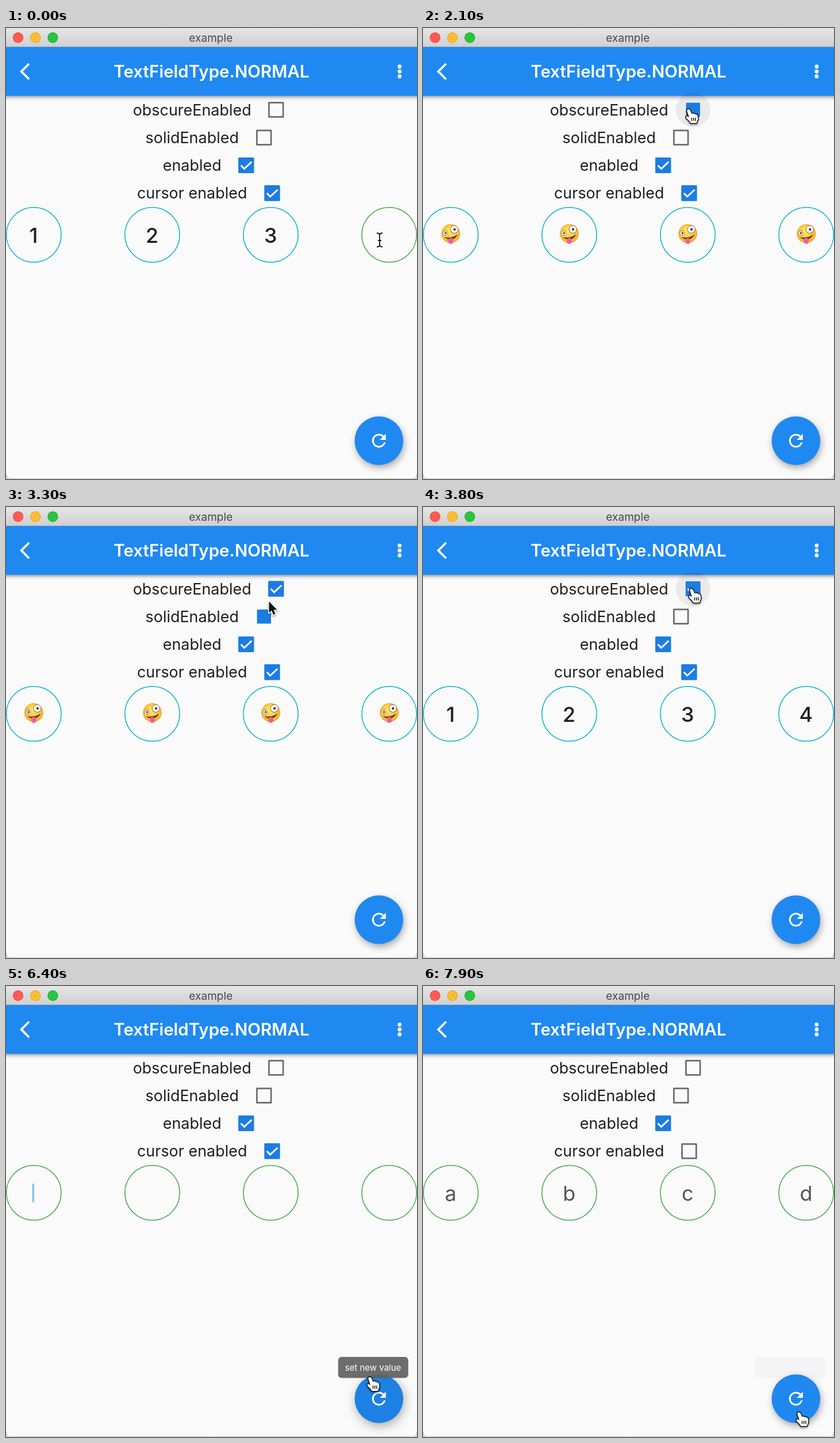
Write an HTML page with a canvas that moves like this. It is 715 px wide and 783 px high and loops after 8 s.

```html
<!DOCTYPE html>
<html lang="en">
<head>
<meta charset="utf-8">
<title>Text field demo</title>
<style>
  html, body { margin: 0; width: 100%; height: 100%; overflow: hidden; background: #fafafa; }
  canvas { display: block; }
</style>
</head>
<body>
<canvas id="stage" width="715" height="783"></canvas>
<script>
const g = document.getElementById('stage').getContext('2d');
const LOOP = 8000, STEP = 100;
const BLUE = '#1f89f1', INK = '#1f1f1f';
const FIELDS = [48.3, 254.5, 460.6, 666.7], FIELD_Y = 359;
const FAB = { x: 648.8, y: 716.5, r: 42.3 };

const refreshIcon = new Path2D('M17.65 6.35C16.2 4.9 14.21 4 12 4c-4.42 0-7.99 3.58-7.99 8s3.57 8 7.99 8c3.73 0 6.84-2.55 7.73-6h-2.08c-.82 2.33-3.04 4-5.65 4-3.31 0-6-2.69-6-6s2.69-6 6-6c1.66 0 3.14.69 4.22 1.78L13 11h7V4z');
const backIcon = new Path2D('M11.67 3.87L9.9 2.1 0 12l9.9 9.9 1.77-1.77L3.54 12z');
const hand = new Path2D('M-3 3Q-3 0 0 0Q2 0 3 2L6 9Q8 7 10 9Q12 8 13 10Q16 9 17 12L18 18Q17 21 15 26L4 26Q1 21-4 17Q-6 13-3 13L1 15Z');
const knuckles = new Path2D('M6 16v6M9.5 16v6M13 16v6');
const arrow = new Path2D('M0 0V20L4.6 15.8L7.6 23L11 21.5L8 14.5H14.2Z');
const ibeam = new Path2D('M-5-12Q0-12 0-8Q0-12 5-12M0-8V8M-5 12Q0 12 0 8Q0 12 5 12M-3 1H3');

// Pointer hot spot: time, x, y
const route = [
  [0, 650, 368], [500, 650, 368], [1500, 462, 141], [2200, 462, 141],
  [2500, 448, 186], [3100, 448, 186], [3500, 467, 142], [3900, 467, 142],
  [4500, 668, 369], [5300, 668, 369], [6000, 640, 700], [6400, 633, 679],
  [6900, 460, 286], [7100, 460, 286], [7600, 654, 740], [8000, 654, 740]
];

const clamp = v => Math.max(0, Math.min(1, v));
const ramp = (t, a, b) => clamp((t - a) / (b - a));
const pulse = (t, on, off, d = 200) => ramp(t, on, on + d) - ramp(t, off, off + d);

function pointerAt(t) {
  const i = route.findIndex(k => k[0] > t);
  const [a, x, y] = route[i - 1], [b, u, v] = route[i];
  const p = ramp(t, a, b), e = p * p * (3 - 2 * p);
  return { x: x + (u - x) * e, y: y + (v - y) * e };
}

function oval(x, y, rx, ry, color, turn = 0) {
  g.beginPath();
  g.ellipse(x, y, rx, ry, turn, 0, 7);
  g.fillStyle = color;
  g.fill();
}

const disc = (x, y, r, color) => oval(x, y, r, r, color);

function line(color, width, ...pts) {
  g.beginPath();
  pts.forEach(p => g.lineTo(...p));
  g.strokeStyle = color;
  g.lineWidth = width;
  g.stroke();
}

function icon(path, x, y) {
  g.save();
  g.translate(x, y);
  g.scale(1.5, 1.5);
  g.fillStyle = '#fff';
  g.fill(path);
  g.restore();
}

function text(s, x, y, size, color = INK, weight = 400) {
  g.font = `${weight} ${size}px Inter, sans-serif`;
  g.textAlign = 'center';
  g.fillStyle = color;
  g.fillText(s, x, y);
}

function shadow(color, blur, x, y) {
  Object.assign(g, { shadowColor: color, shadowBlur: blur, shadowOffsetX: x, shadowOffsetY: y });
}

function drawBars() {
  g.save();
  shadow('rgba(0,0,0,.42)', 6, 0, 2);
  g.fillStyle = BLUE;
  g.fillRect(-10, 33, 735, 84.8);
  g.restore();
  const grad = g.createLinearGradient(0, 0, 0, 33);
  grad.addColorStop(0, '#e6e6e6');
  grad.addColorStop(1, '#cfcfcf');
  g.fillStyle = grad;
  g.fillRect(0, 0, 715, 33);
  line('#b5b3b0', 1, [0, 32.5], [715, 32.5]);
  [[21, '#df4744', '#ff5952'], [51.2, '#dea031', '#ffbc2e'], [81.4, '#22a131', '#28c63f']].forEach(([x, rim, fill]) => {
    disc(x, 16.8, 9.2, rim);
    disc(x, 16.8, 8.3, fill);
  });
  text('example', 356.3, 24, 19.1, '#484848');
  text('TextFieldType.NORMAL', 357.5, 86, 29.5, '#fff', 600);
  icon(backIcon, 24, 57.5);
  [67, 75.5, 84].forEach(y => disc(684.8, y, 3.4, '#fff'));
}

function checkbox(x, y, p, hover) {
  if (hover) disc(x, y, 30, 'rgba(0,0,0,.062)');
  const fill = clamp(p * 2), hole = 22 * (1 - fill);
  const half = 12.2 + 3 * Math.abs(p - .5);
  const mix = (a, b) => a + (b - a) * fill;
  g.beginPath();
  g.roundRect(x - half, y - half, half * 2, half * 2, 1.5);
  if (hole > 0) g.rect(x - hole / 2, y - hole / 2, hole, hole);
  g.fillStyle = `rgb(${mix(107, 28)},${mix(107, 124)},${mix(107, 227)})`;
  g.fill('evenodd');
  if (p > .5) {
    g.save();
    g.setLineDash([26 * (p * 2 - 1), 99]);
    line('#fff', 2.9, [x - 9.2, y], [x - 3.3, y + 6], [x + 9.7, y - 6.2]);
    g.restore();
  }
}

function eye(x, y, r, pupil) {
  disc(x, y, r, '#7a5a2c');
  disc(x, y, r - .8, '#fff');
  disc(x + .4, y, pupil, '#4a2c18');
}

function zanyFace(x, y) {
  g.save();
  g.translate(x, y);
  const grad = g.createRadialGradient(-2, -5, 3, 0, 0, 17);
  grad.addColorStop(0, '#ffe25c');
  grad.addColorStop(.7, '#fbc83e');
  grad.addColorStop(1, '#ec9b2c');
  disc(0, 0, 16.4, grad);
  eye(-9.5, -1, 4.4, 1.8);
  eye(6.2, -7.3, 7, 2.1);
  g.beginPath();
  g.moveTo(-11, 6);
  g.quadraticCurveTo(3, 8.5, 12, 1);
  g.quadraticCurveTo(9, 10, 0, 10.5);
  g.quadraticCurveTo(-7, 10.5, -11, 6);
  g.fillStyle = '#75401d';
  g.fill();
  oval(0, 12.8, 4.8, 5.2, '#f0679c', -.15);
  line('#d84a80', 1, [0, 10], [.6, 15]);
  g.restore();
}

function fields(t) {
  const emoji = t >= 2050 && t < 3750;
  const solid = t >= 2650 && t < 3200;
  const reset = t >= 7800;
  const keys = [4440, 4640, 5000, 5200];
  const count = t < 300 ? 3 : 4 - keys.filter(k => t >= k).length;
  FIELDS.forEach((x, i) => {
    const filled = i < count;
    g.beginPath();
    g.arc(x, FIELD_Y, 47.6, 0, 7);
    if (solid) {
      g.fillStyle = '#969696';
      g.fill();
    }
    g.strokeStyle = filled ? '#06b2cc' : '#43a548';
    g.lineWidth = 1.5;
    g.stroke();
    if (reset) text('abcd'[i], x - .3, 373, 36, '#565656');
    else if (filled && emoji) zanyFace(x, 357);
    else if (filled) text(i + 1, x - .3, 373, 36, INK, 500);
  });
  if (count < 4 && t < 7000) {
    const last = Math.max(-500, ...keys.filter(k => k <= t));
    g.globalAlpha = clamp(.5 + .9 * Math.cos((t - last) * Math.PI / 500));
    line('#50b1dc', 3, [FIELDS[count] - 1, 343], [FIELDS[count] - 1, 375.5]);
    g.globalAlpha = 1;
  }
}

function fab(tip) {
  g.save();
  shadow('rgba(0,0,0,.33)', 12 + 5 * tip, 2, 5);
  disc(FAB.x, FAB.y, FAB.r, BLUE);
  g.restore();
  disc(FAB.x, FAB.y, FAB.r, `rgba(0,0,0,${.06 * tip})`);
  icon(refreshIcon, FAB.x - 18, FAB.y - 18);
  g.globalAlpha = tip;
  g.beginPath();
  g.roundRect(577.8, 644, 122, 36.5, 6);
  g.fillStyle = 'rgba(97,97,97,.92)';
  g.fill();
  text('set new value', 638.5, 668, 15, '#fff');
  g.globalAlpha = 1;
}

function pointer(p, onButton) {
  g.save();
  g.translate(p.x, p.y);
  g.lineJoin = 'round';
  const inField = FIELD_Y - 48 < p.y && p.y < FIELD_Y + 48;
  if (inField && !onButton) {
    g.strokeStyle = '#fff';
    g.lineWidth = 4;
    g.stroke(ibeam);
    g.strokeStyle = '#111';
    g.lineWidth = 1.8;
    g.stroke(ibeam);
  } else {
    const shape = onButton ? hand : arrow;
    if (onButton) g.scale(.92, .92);
    shadow('rgba(0,0,0,.35)', 3, 0, 2);
    g.lineWidth = 3.2;
    g.strokeStyle = onButton ? '#111' : '#fff';
    g.stroke(shape);
    shadow('transparent', 0, 0, 0);
    g.fillStyle = onButton ? '#fff' : '#111';
    g.fill(shape);
    if (onButton) {
      g.lineWidth = 1.6;
      g.stroke(knuckles);
    }
  }
  g.restore();
}

function windowEdge() {
  g.beginPath();
  g.rect(0, 770, 715, 13);
  g.roundRect(0, 740, 715, 43, 8);
  g.save();
  g.clip('evenodd');
  g.fillStyle = '#d6d6d6';
  g.fillRect(0, 774, 715, 9);
  g.restore();
  g.beginPath();
  g.moveTo(.5, 774);
  g.quadraticCurveTo(.5, 782.5, 9, 782.5);
  g.lineTo(706, 782.5);
  g.quadraticCurveTo(714.5, 782.5, 714.5, 774);
  g.strokeStyle = '#c2c2c2';
  g.lineWidth = 1;
  g.stroke();
}

function draw(t) {
  const p = pointerAt(t);
  const tip = pulse(t, 6000, 6500) + ramp(t, 7895, 8020);
  const near = (x, y, r) => Math.hypot(p.x - x, p.y - y) < r;
  const rows = [
    ['obscureEnabled', 469.8, 142, pulse(t, 2000, 3750)],
    ['solidEnabled', 448.8, 190.2, pulse(t, 2690, 3200)],
    ['enabled', 417.8, 238.4, 1],
    ['cursor enabled', 463, 286.8, 1 - ramp(t, 7000, 7200)]
  ];
  g.fillStyle = '#fafafa';
  g.fillRect(0, 0, 715, 783);
  drawBars();
  let onButton = near(FAB.x, FAB.y, FAB.r);
  rows.forEach(([label, x, y, on]) => {
    const hover = near(x, y, 22);
    onButton ||= hover;
    text(label, 323.7, y + 9.6, 26.95);
    checkbox(x, y, on, hover);
  });
  fields(t);
  fab(tip);
  windowEdge();
  pointer(p, onButton);
}

function frame() {
  draw(Math.floor(performance.now() % LOOP / STEP) * STEP);
  requestAnimationFrame(frame);
}
frame();
</script>
</body>
</html>
```
